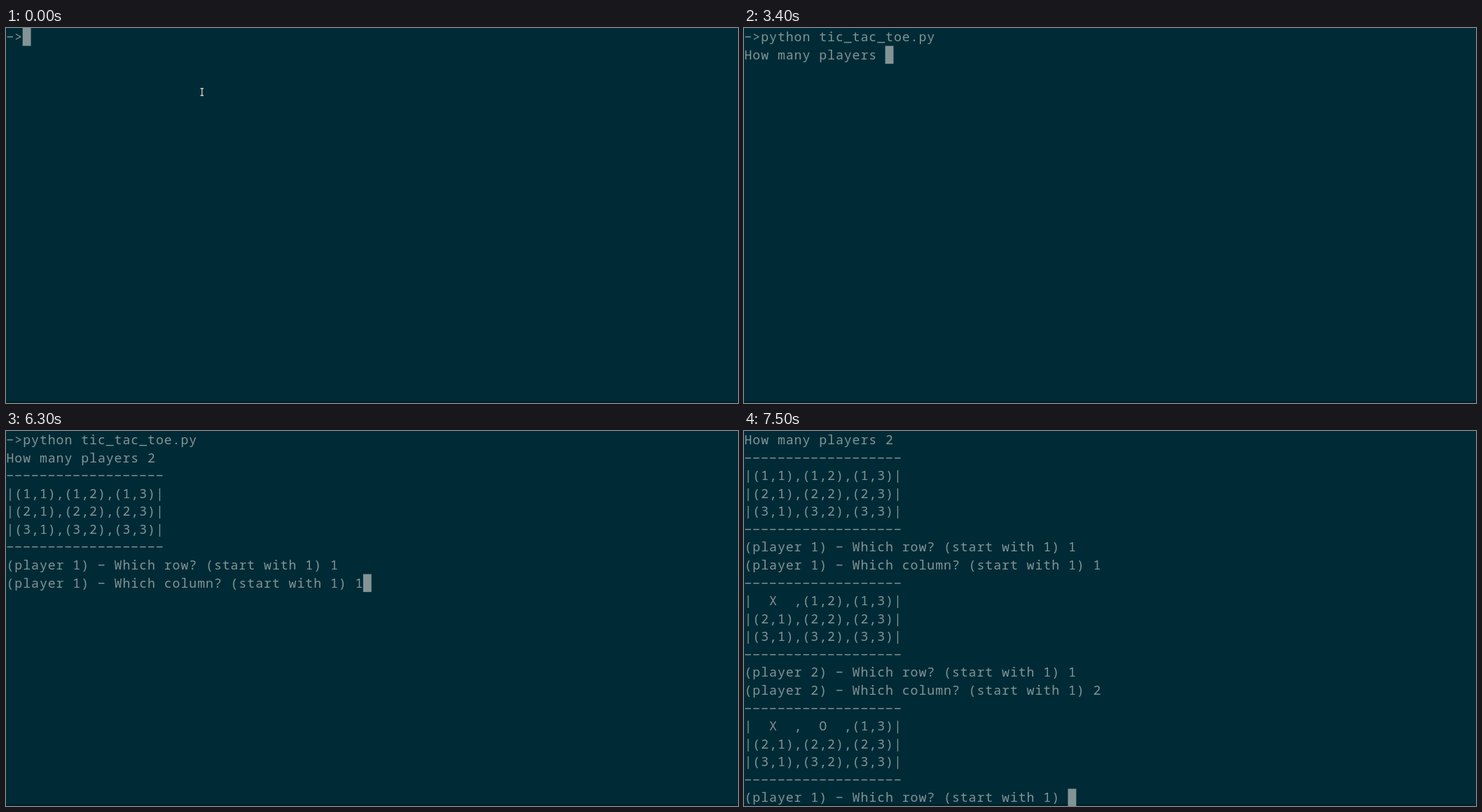
These frames come from a looping animation (1045 by 536 pixels, 8000 ms). An HTML page:

```html
<!DOCTYPE html>
<html lang="en">
<head>
<meta charset="utf-8">
<title>Terminal game</title>
<style>
  html, body { margin: 0; width: 100%; height: 100%; overflow: hidden; background: #002b36; }
  svg { display: block; }
  text {
    font: 18.2px "Noto Sans Mono", "DejaVu Sans Mono", monospace;
    letter-spacing: calc(11.857px - 1ch);
    white-space: pre;
    fill: #839496;
  }
</style>
</head>
<body>
<svg id="stage" width="1045" height="536" viewBox="0 0 1045 536">
  <rect width="1045" height="536" fill="#002b36"/>
  <rect y="533" width="1045" height="3" fill="#00222c"/>
  <g id="rows"></g>
  <rect id="cursor" fill="#839496"/>
  <g id="pointer" fill="none">
    <path d="M277.5 86.5h4.5M277.5 96.5h4.5M279.8 86.5v10" stroke="#001a21" stroke-width="2.6"/>
    <path d="M277.5 86.5h4.5M277.5 96.5h4.5M279.8 86.5v10" stroke="#d5dadb" stroke-width="1.3"/>
  </g>
</svg>
<script>
const LOOP = 8000, CELL = 11.857, LINE = 25.57, ROWS = 21, BASELINE = 19;
const POINTER_HIDES = 1400;
const byId = id => document.getElementById(id);
const cursor = byId("cursor"), pointer = byId("pointer");

const rule = "-".repeat(19) + "\n";
const ask = (player, what) => `(player ${player}) - Which ${what}? (start with 1) `;

function board(marks = {}) {
  const cell = (r, c) => marks[`${r}${c}`] ? `  ${marks[`${r}${c}`]}  ` : `(${r},${c})`;
  const row = r => `|${[1, 2, 3].map(c => cell(r, c)).join(",")}|\n`;
  return rule + [1, 2, 3].map(row).join("") + rule;
}

// Each entry appends its output to the terminal at the given time.
const output = [
  [0, "->"],
  [1400, "p"],
  [1500, "yt"],
  [1700, "hon"],
  [2300, " "],
  [2400, "t"],
  [2500, "i"],
  [2600, "c_tac_toe.py "],
  [3300, "\n"],
  [3400, "How many players "],
  [4800, "2"],
  [4900, "\n" + board() + ask(1, "row")],
  [5600, "1"],
  [5700, "\n" + ask(1, "column")],
  [6300, "1"],
  [6400, "\n" + board({ 11: "X" }) + ask(2, "row")],
  [7200, "1"],
  [7300, "\n" + ask(2, "column")],
  [7400, "2"],
  [7500, "\n" + board({ 11: "X", 12: "O" }) + ask(1, "row")]
];

const rows = Array.from({ length: ROWS }, (_, i) => {
  const row = document.createElementNS("http://www.w3.org/2000/svg", "text");
  row.setAttribute("x", 0.47);
  row.setAttribute("y", i * LINE + BASELINE);
  byId("rows").append(row);
  return row;
});
cursor.setAttribute("width", CELL);
cursor.setAttribute("height", LINE);

let shown = null;
function render(time) {
  const text = output.filter(([at]) => at <= time).map(([, part]) => part).join("");
  if (text === shown) return;
  shown = text;
  const lines = text.split("\n").slice(-ROWS);
  // The minus glyph gives the wide, raised dash of the terminal font.
  rows.forEach((row, i) => { row.textContent = (lines[i] || "").replace(/-/g, "\u2212"); });
  cursor.setAttribute("x", lines.at(-1).length * CELL);
  cursor.setAttribute("y", (lines.length - 1) * LINE);
  pointer.setAttribute("visibility", time < POINTER_HIDES ? "visible" : "hidden");
}

const start = performance.now();
function tick() {
  render((performance.now() - start) % LOOP);
  requestAnimationFrame(tick);
}
tick();
</script>
</body>
</html>
```
